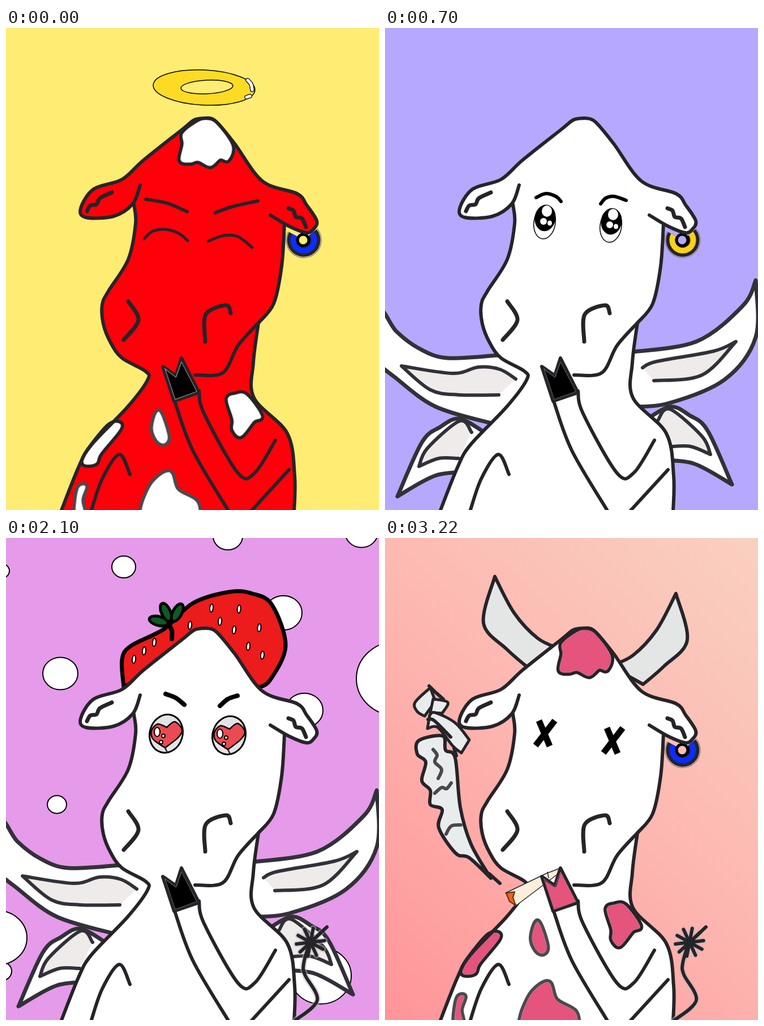
Animation, 659 px wide and 850 px high, one loop 3.5 s. Source, as an HTML page with a canvas:

```html
<!DOCTYPE html>
<html lang="en">
<head>
<meta charset="utf-8">
<title>Cow portraits</title>
<style>
  html, body { margin: 0; overflow: hidden; }
  canvas { display: block; }
</style>
</head>
<body>
<canvas id="stage" width="659" height="850"></canvas>
<script>
const ctx = document.getElementById('stage').getContext('2d');
const INK = '#262428', SLATE = '#323138', SCENE_MS = 700;
const { PI, cos, sin } = Math;

const blush = ctx.createLinearGradient(-40, 760, 640, 20);
['#ff979a', '#fdb6b0', '#f9cfc0'].forEach((c, i) => blush.addColorStop(i / 2, c));

// "x,y" points; a trailing "!" makes a sharp corner
const points = s => s.split(' ').flatMap(t => {
  const p = t.replace('!', '').split(',').map(Number);
  return t.endsWith('!') ? [p, p] : [p];
});

// Smooth curve through all points
function curve(p, closed) {
  const path = new Path2D(), n = p.length;
  const at = i => closed ? p[(i + n) % n] : p[Math.max(0, Math.min(n - 1, i))];
  path.moveTo(...p[0]);
  for (let i = 0; i < (closed ? n : n - 1); i++) {
    const [a, b, c, d] = [at(i - 1), at(i), at(i + 1), at(i + 2)];
    if (b[0] === c[0] && b[1] === c[1]) continue;
    path.bezierCurveTo(b[0] + (c[0] - a[0]) / 6, b[1] + (c[1] - a[1]) / 6,
      c[0] - (d[0] - b[0]) / 6, c[1] - (d[1] - b[1]) / 6, ...c);
  }
  if (closed) path.closePath();
  return path;
}

function paint(path, fill, width, color = INK) {
  if (fill) { ctx.fillStyle = fill; ctx.fill(path); }
  if (width) { ctx.lineWidth = width; ctx.strokeStyle = color; ctx.stroke(path); }
}
const line = (s, width = 6, color = INK) => paint(curve(points(s)), null, width, color);
const lines = (list, width, color) => list.forEach(s => line(s, width, color));
const shape = (s, fill, width = 6, color = INK) => paint(curve(points(s), true), fill, width, color);

function oval(x, y, rx, ry, fill, width = 0, turn = 0) {
  const path = new Path2D();
  path.ellipse(x, y, rx, ry, turn, 0, 2 * PI);
  paint(path, fill, width, '#000');
}

function rays(x, y, start, step, count, length, width, color) {
  for (let i = 0; i < count; i++) {
    const a = start + i * step;
    line(`${x},${y} ${x + length * cos(a)},${y + length * sin(a)}`, width, color);
  }
}

// Draws once as is, then again shifted (and flipped when sx is -1)
function twice(dx, dy, draw, sx = 1) {
  draw();
  ctx.save();
  ctx.transform(sx, 0, 0, 1, dx, dy);
  draw();
  ctx.restore();
}
const mirrored = (dx, dy, draw) => twice(dx, dy, draw, -1);

const earL = '352,159 333,162 310,180 243,233 205,267 155,284 132,318 141,334 190,332 224,310 237,277!';
const sideL = '226,311! 229,345 216,408 181,464 170,488 172,522 185,555 205,582 246,605 250,621 215,668 151,735 128,775 97,853!';
const earR = '352,159 371,165 404,204 453,270 514,292 531,312 549,340 543,355 530,361 499,349 467,330!';
const headR = '492,346! 487,420 473,486 447,519';
const chin = '447,519 410,560 383,608 334,612';
const neckR = '446,520 437,590 438,652 497,715 510,790 509,853!';
const silhouette = curve([...points(earL), ...points(sideL),
  ...points([earR, headR, neckR].join(' ')).reverse()], true);

const darkSpots = [
  '313,187 333,170 352,162 370,168 398,207 392,232 378,230 361,243 340,234 325,237 309,233 314,205',
  '392,655 405,647 424,648 450,684 437,693 415,719 402,708 402,690',
  '198,697 200,708 166,750 158,767 138,768 144,749 180,704'
];
const greySpots = [
  '270,677 285,718 280,732 268,727 260,705',
  '130,810 140,809 133,832 137,856 124,856 125,830',
  '289,784 302,815 335,835 341,860! 238,860! 245,832 262,800'
];

function drawSpots(fill, edge) {
  const spot = color => s => {
    shape(s, null, 12, color);
    shape(s, fill, 1, edge);
  };
  darkSpots.forEach(spot(INK));
  greySpots.forEach(spot('#4b4a4d'));
}

function drawBody({ skin, hoof, spot, edge, smoking }) {
  paint(silhouette, skin);
  if (spot) drawSpots(spot, edge);
  lines([earL, sideL, earR, headR, chin, neckR,
    '298,658 330,745 394,853',
    '341,640 350,680 410,785 440,784 476,727',
    '500,779 432,853',
    '150,853 170,795 200,752 219,787']);
  lines(['143,323 149,313 160,311 166,300 187,290',
    '499,318 508,322 512,333 523,336 530,351',
    '216,482 234,515 208,550',
    '352,553 353,505 389,489 397,503'], 7);
  if (smoking) drawCigarette();
  shape('277,597! 300,613! 310,582! 341,643! 297,658!', hoof, 6);
  shape('281,601! 300,616! 310,589! 337,641! 299,655!', null, 0.8, edge || '#777');
}

function drawCigarette() {
  shape('213,626! 284,592! 310,582! 306,592! 232,648!', '#fdeeda', 1.5);
  lines(['277,596 282,605', '287,589 289,599'], 1.5);
  shape('214,626! 229,624! 226,634! 231,648! 220,641!', '#e8651a', 2, '#5a2a10');
}

function drawSmoke() {
  const fog = '#e9eced';
  shape('80,264! 53,290 57,306 70,314! 89,288!', fog, 5);
  shape('85,284! 111,290 101,309! 80,308!', fog, 5);
  shape('79,312! 75,336! 93,334 120,367 135,379! 149,356! 124,326 89,308', fog, 5);
  shape('60,357 102,349 107,374 124,388 133,475 152,540 187,600! 149,564 125,556 95,511 101,479 80,470 80,445 65,428 72,395 57,381', fog);
  lines(['78,261 88,271 103,284', '76,320 87,322 116,351', '122,371 126,384', '184,592 203,609']);
  lines(['85,373 92,383 88,395 100,408 94,424', '88,450 100,440 109,442 117,432', '108,522 117,508 134,506'], 6, '#4a484c');
}

function drawEarring(color) {
  const arc = (radius, width, tint) => {
    const path = new Path2D();
    path.arc(526, 374, radius, -0.7, PI + 0.5);
    paint(path, null, width, tint);
  };
  ctx.lineCap = 'butt';
  arc(31, 1.5, '#8b8585');
  arc(19, 21, INK);
  arc(18.5, 10, color);
  ctx.lineCap = 'round';
  oval(525, 374, 10, 10, null, 5);
}

function drawWings() {
  const white = s => shape(s, '#fff', 7, SLATE);
  const fold = s => paint(curve(points(s)), '#eeebea', 6, SLATE);
  mirrored(635, 21, () => {
    white('455,695! 503,668 538,683 570,710 613,805! 545,768 480,762!');
    fold('482,692 503,672 560,720 575,752! 540,738 505,738');
  });
  white('-8,500 20,535 60,565 110,582 200,577! 260,610! 200,700! 90,668 15,614 -8,596!');
  fold('231,619 203,602 165,598 120,609 29,596! 80,638 130,647 201,647');
  white('430,572! 550,553 632,490 655,445! 655,545 600,620 500,662 430,668!');
  fold('455,599 480,588 580,570 620,553! 560,612 475,622');
}

function drawTail() {
  for (const [width, color] of [[11, 'rgba(190,185,190,.5)'], [6, INK]]) {
    line('512,850 550,815 528,770 526,750 535,718', width, color);
    rays(538, 713, -0.75, PI / 5, 10, 25, width, color);
  }
  line('538,713 567,686');
}

function drawHalo() {
  oval(350, 105, 90, 31, '#fddb24', 1.5, 0.05);
  oval(355, 104, 46, 12, '#ffec72', 1.5, -0.05);
  for (const [width, color] of [[8, INK], [5, '#fff']])
    lines(['427,92 433,99 435,109', '425,122 431,120'], width, color);
}

function drawStrawberry() {
  shape('208,263! 205,214 221,190 280,160 330,115 395,95 435,98 470,118 494,190 467,250 445,264! 352,180!', '#ec1b1c', 7, '#000');
  line('293,178 293,163 287,153', 8, '#000');
  for (let i = 0; i < 3; i++) {
    const a = 0.25 + 0.9 * i;
    oval(292 - 23 * cos(a), 152 - 23 * sin(a), 17, 8, '#0d5a22', 5, a);
  }
  const seed = (x, y) => oval(x, y, 3, 7, '#fff', 2, 0.1);
  for (let i = 0; i < 5; i++) seed(385 + 70 * cos(0.71 * i - 2.6), 190 + 70 * sin(0.71 * i - 2.6));
  for (let i = 0; i < 3; i++) {
    seed(226 + 18 * i, 214 - 15 * i);
    seed(378 + 25 * i, 147 + 8 * i + 7 * i * i);
  }
}

function drawBubbles() {
  const bubbles = '208,51,21 392,-3,26 628,-10,29 -8,58,14 490,132,33 96,239,31 690,248,71 527,304,33 90,470,17 -8,764,18 -15,705,52 556,772,54';
  for (const [x, y, r] of points(bubbles)) oval(x, y, r, r * 0.92, '#fff', 2);
}

function drawHorn() {
  shape('194,68! 174,150 215,196 252,228! 310,196! 270,177 228,132', '#e3e6e5', 6);
}

function puppyEye() {
  oval(282, 343, 19, 29, '#fff', 1.5, 0.15);
  oval(283, 335, 18, 23, '#000', 1, 0.15);
  oval(286, 323, 9, 10, '#fff');
  oval(280, 341, 6, 6, '#fff');
  oval(291, 344, 4, 4.5, '#fff');
}

function heartEye() {
  oval(283, 345, 29, 34, '#e4e4e6', 3, 0.3);
  shape('284,334! 298,324 311,338 304,352 281,370! 260,355 257,340 268,328', '#ea4b52', 2.5, '#000');
  line('281,370 285,378', 2.5);
  oval(267, 342, 5, 8, '#fff', 2);
  oval(278, 349, 3, 3, '#fff', 2);
  oval(274, 360, 3, 3, '#fff', 2);
}

function drawCross() {
  lines(['272,322 291,367', '300,322 266,366'], 11, '#000');
}

function drawCheek() {
  for (let x = 241; x < 270; x += 13) line(`${x},409 ${x},422 ${x + 2},432`, 6, '#3b3638');
}

const scenes = [
  { back: '#ffec72', skin: '#ff000a', hoof: '#000', spot: '#fff', edge: '#d9cccc', ring: '#0d2cff',
    behind: drawHalo,
    face() {
      lines(['247,302 285,309 320,324', '369,326 400,315 445,305']);
      lines(['244,372 258,359 280,355 305,362 321,375', '357,376 385,366 410,368 435,387'], 5);
    } },
  { back: '#b6a8fe', skin: '#fff', hoof: '#000', ring: '#fcd116',
    behind: drawWings,
    face() {
      lines(['267,299 284,292 302,297 311,306', '381,310 390,300 405,297 426,304'], 6, '#000');
      twice(117, 6, puppyEye);
    } },
  { back: blush, skin: '#f9cccd', hoof: '#1e1d1b', spot: '#1e1d1b', edge: '#b9b3b5', ring: '#0d2cff', smoking: true,
    face() {
      lines(['250,342 285,330 306,341 320,357', '362,359 402,349 440,371'], 6, '#3b3638');
      rays(260, 337, 3, 0.35, 3, 20, 6, '#3b3638');
      rays(437, 368, -1.1, 0.8, 3, 14, 6, '#3b3638');
      twice(135, 23, drawCheek);
    } },
  { back: '#e69aea', skin: '#fff', hoof: '#000',
    behind() { drawBubbles(); drawWings(); drawStrawberry(); },
    face() {
      lines(['282,275 300,282 315,294', '409,278 392,284 378,296'], 8, '#000');
      twice(111, 3, heartEye);
    },
    front: drawTail },
  { back: blush, skin: '#fff', hoof: '#e4547d', spot: '#e4547d', edge: '#cc7f96', ring: '#0d2cff', smoking: true,
    behind() { mirrored(708, 30, drawHorn); },
    face() {
      ctx.lineCap = 'butt';
      twice(120, 13, drawCross);
      ctx.lineCap = 'round';
    },
    front: drawTail }
];

function drawScene(scene) {
  ctx.lineCap = ctx.lineJoin = 'round';
  ctx.fillStyle = scene.back;
  ctx.fillRect(0, 0, 659, 850);
  scene.behind?.();
  if (scene.ring) drawEarring(scene.ring);
  drawBody(scene);
  if (scene.smoking) drawSmoke();
  scene.face();
  scene.front?.();
}

function tick() {
  drawScene(scenes[Math.floor(performance.now() / SCENE_MS) % scenes.length]);
  requestAnimationFrame(tick);
}
tick();
</script>
</body>
</html>
```
